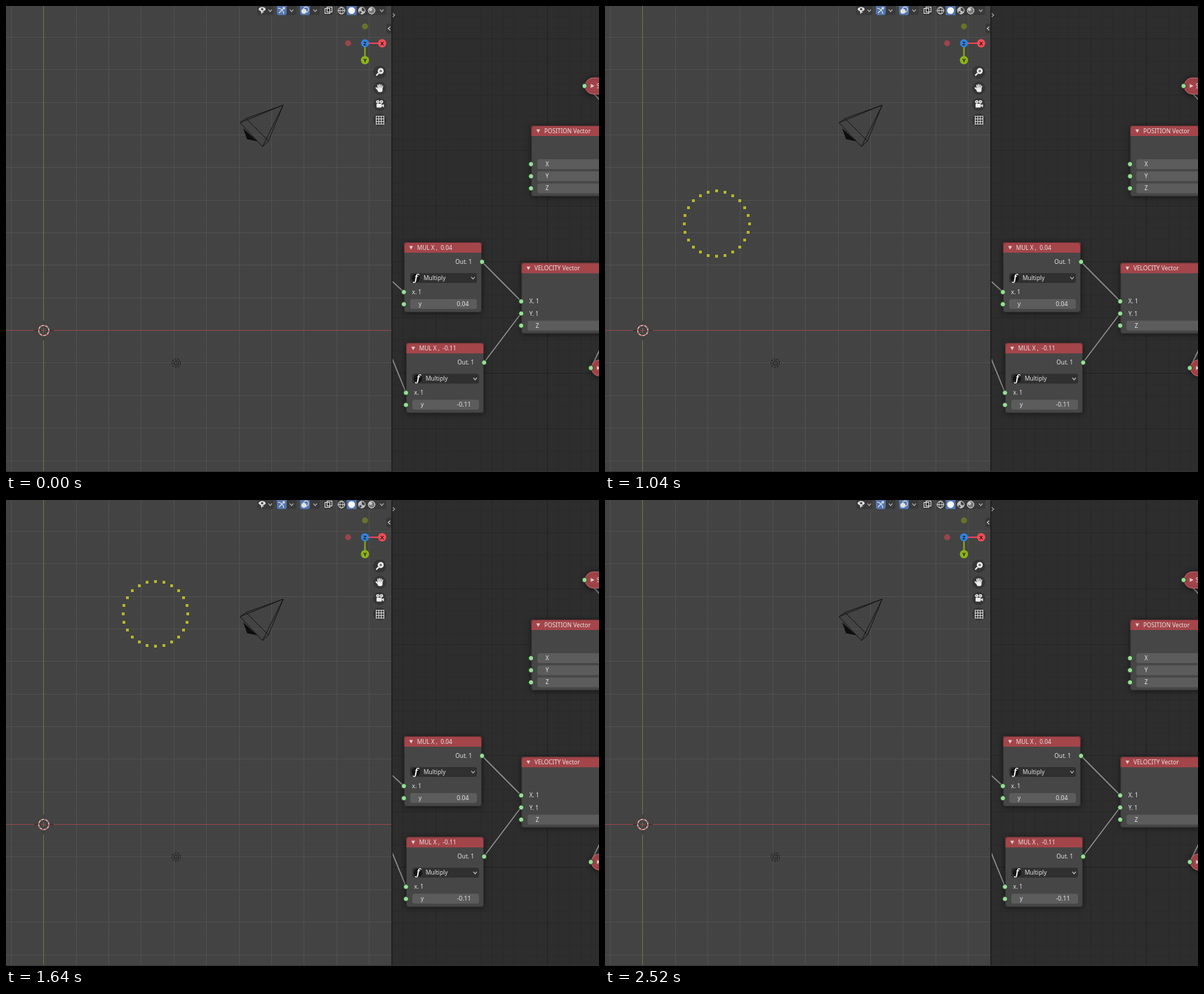
An HTML page with a canvas for the animation above (2600 ms loop, 845 px wide and 663 px high).

```html
<!DOCTYPE html>
<html lang="en">
<head>
<meta charset="utf-8">
<title>Particle circle with node editor</title>
<style>
html, body { margin: 0; width: 100%; height: 100%; overflow: hidden; background: #434343; }
canvas { display: block; }
</style>
</head>
<body>
<canvas id="stage" width="845" height="663"></canvas>
<script>
const W = 845, H = 663, LOOP = 2600, TAU = Math.PI * 2;
const UNIT = 46.37, ORIGIN = { x: 53.8, y: 461.6 };
const view = document.getElementById('stage').getContext('2d');
const backdrop = document.createElement('canvas');
backdrop.width = W;
backdrop.height = H;
const g = backdrop.getContext('2d');

function rect(x, y, w, h, fill) {
  g.fillStyle = fill;
  g.fillRect(x, y, w, h);
}

function line(points, color, width = 1, close = false) {
  g.beginPath();
  points.forEach(([x, y]) => g.lineTo(x, y));
  if (close) g.closePath();
  g.strokeStyle = color;
  g.lineWidth = width;
  g.stroke();
}

function poly(points, fill) {
  g.beginPath();
  points.forEach(([x, y]) => g.lineTo(x, y));
  g.fillStyle = fill;
  g.fill();
}

function disc(x, y, r, fill, stroke, width = 1) {
  g.beginPath();
  g.arc(x, y, r, 0, TAU);
  if (fill) { g.fillStyle = fill; g.fill(); }
  if (stroke) { g.strokeStyle = stroke; g.lineWidth = width; g.stroke(); }
}

function box(x, y, w, h, r, fill, stroke) {
  g.beginPath();
  g.roundRect(x, y, w, h, r);
  if (fill) { g.fillStyle = fill; g.fill(); }
  if (stroke) { g.strokeStyle = stroke; g.lineWidth = 1; g.stroke(); }
}

function text(str, x, y, { size = 8.3, align = 'left', color = '#e4e4e4', weight = '' } = {}) {
  g.font = `${weight} ${size}px "Noto Sans", sans-serif`;
  g.textAlign = align;
  g.textBaseline = 'alphabetic';
  g.fillStyle = color;
  g.fillText(str, x, y + 3);
}

function chevron(x, y, dx = 0, dy = 1, color = '#c8c8c8') {
  const tip = 1.5, wing = 2.5;
  line([
    [x - dx * tip - dy * wing, y - dy * tip - dx * wing],
    [x + dx * tip, y + dy * tip],
    [x - dx * tip + dy * wing, y - dy * tip + dx * wing]
  ], color, 1.1);
}

function viewportGrid() {
  rect(0, 0, 549, H, '#434343');
  const sub = UNIT / 10;
  for (let x = ORIGIN.x % sub; x < 549; x += sub) rect(x - 0.5, 0, 1, H, 'rgba(255,255,255,.008)');
  for (let y = ORIGIN.y % sub; y < H; y += sub) rect(0, y - 0.5, 549, 1, 'rgba(255,255,255,.008)');
  for (let x = ORIGIN.x % UNIT; x < 549; x += UNIT) rect(Math.floor(x), 0, 1, H, '#505050');
  for (let y = ORIGIN.y % UNIT; y < H; y += UNIT) rect(0, Math.floor(y), 549, 1, '#505050');
  rect(53, 0, 1, H, '#6c7743');
  rect(0, 461, 549, 1, '#95484a');
}

function cursor3d() {
  const { x, y } = ORIGIN;
  [[0, 1], [0, -1], [1, 0], [-1, 0]].forEach(([dx, dy]) =>
    line([[x + dx * 4, y + dy * 4], [x + dx * 14, y + dy * 14]], '#302c2a'));
  disc(x, y, 7.3, null, '#e9dcdc', 1.3);
  g.setLineDash([2.87, 2.87]);
  disc(x, y, 7.3, null, '#c94a4a', 1.3);
  g.setLineDash([]);
}

function cameraAndLamp() {
  const apex = [395, 141];
  const frame = [[333.5, 166], [342, 160], [374, 192], [365.5, 200]];
  line(frame, '#161616', 1, true);
  frame.forEach(p => line([apex, p], '#161616'));
  poly([[338, 174], [343.5, 189.5], [358, 192.5]], '#0d0d0d');

  const x = 242.5, y = 508;
  disc(x, y, 3.2, null, '#1e1e1e');
  disc(x, y, 0.8, '#1e1e1e');
  g.setLineDash([2.3, 1.9]);
  disc(x, y, 6, null, '#1e1e1e', 1.2);
  g.setLineDash([]);
}

function toolbar() {
  const white = '#e2e2e2', blue = '#5275ad', dark = '#393939';
  box(358, -4, 23, 17, 3, dark);
  box(386, -4, 28, 17, 3, dark);
  box(386, -4, 14, 17, 3, blue);
  box(419, -4, 28, 17, 3, dark);
  box(419, -4, 14, 17, 3, blue);
  box(453, -4, 13, 17, 3, dark);
  box(472, -4, 70, 17, 3, dark);
  rect(485.5, 0, 14, 13, blue);
  [376.5, 407, 440.5, 535.5].forEach(x => chevron(x, 6.5));

  // visibility
  g.beginPath();
  g.ellipse(365, 4.5, 5, 3, 0, 0, TAU);
  g.fillStyle = white;
  g.fill();
  disc(365, 4.5, 1.6, dark);
  poly([[363, 6], [368, 9], [365, 9.5], [364, 12]], white);

  // gizmo toggle
  g.beginPath();
  g.arc(387, 12, 9, -1.5, -0.1);
  g.strokeStyle = white;
  g.lineWidth = 1.1;
  g.stroke();
  line([[389, 10], [396, 3]], white, 1.1);
  poly([[397.5, 1.5], [397, 5.5], [393.5, 2]], white);

  // overlays
  disc(424.5, 7.5, 3.6, white);
  disc(427.5, 5, 3.6, null, white, 1.1);

  // x-ray
  g.strokeStyle = white;
  g.lineWidth = 1;
  g.strokeRect(454.5, 3.5, 7, 7);
  g.strokeRect(457.5, 1.5, 7, 7);

  // shading modes
  disc(478, 6.5, 4.8, null, white);
  line([[473, 6.5], [483, 6.5]], white, 0.8);
  g.beginPath();
  g.ellipse(478, 6.5, 2.1, 4.8, 0, 0, TAU);
  g.stroke();
  disc(492.4, 6.5, 4.8, '#fff');
  disc(507, 6.5, 4.8, '#bdbdbd', white, 0.8);
  poly([[507, 6.5], [507, 2], [511, 4], [511, 8]], '#444');
  disc(505, 9, 1.7, '#444');
  disc(521, 6.5, 4.8, '#777', white);
  disc(519.5, 5, 2.3, '#ccc');
}

function axisGizmo() {
  const label = (s, x, y) => text(s, x, y, { size: 7.5, align: 'center', color: '#1a1a1a', weight: 'bold' });
  line([[512, 53], [536, 53]], '#e8455a', 2);
  line([[511.5, 53], [511.5, 77]], '#8bb01c', 2);
  disc(511.5, 29, 4.3, '#67732a');
  disc(487.5, 53, 4.3, '#9a444b');
  disc(511.5, 53, 5.7, '#3084e0');
  disc(536, 53, 5.9, '#f34b55');
  disc(511.5, 77, 5.9, '#8bb31a');
  label('Z', 511.5, 53);
  label('X', 536, 53);
  label('Y', 511.5, 77);
  box(542, 25, 10, 14, 4, '#363636');
  chevron(546, 32, -1, 0);
}

function navButtons() {
  const x = 532.5, white = '#eeeeee';
  [94, 117, 140, 162].forEach(y => disc(x, y, 9.3, '#353535'));

  disc(534, 92.5, 4.2, white);
  line([[531, 95.5], [527.5, 99]], white, 2);
  line([[532, 92.5], [536, 92.5]], '#444');
  line([[534, 90.5], [534, 94.5]], '#444');

  g.lineCap = 'round';
  [[530, 112.5], [532.3, 111.7], [534.6, 112.3], [536.7, 114]].forEach(([fx, fy], i) =>
    line([[530.4 + i * 1.7, 118], [fx, fy]], white, 1.6));
  line([[527.5, 116.5], [531, 120]], white, 1.8);
  g.lineCap = 'butt';
  box(529.6, 116.5, 6.9, 6, 2.5, white);

  disc(529.8, 136.3, 2.4, white);
  disc(535, 136.3, 2.4, white);
  disc(529.8, 136.3, 0.8, '#444');
  disc(535, 136.3, 0.8, '#444');
  box(528, 139, 7.5, 5.5, 1, white);
  poly([[535, 141.5], [538.5, 139.5], [538.5, 144.5]], white);

  for (let i = 0; i < 4; i++) {
    const d = -5 + i * 3.67;
    line([[x - 5.5, 162 + d], [x + 6.5, 162 + d]], white, 0.9);
    line([[x + d, 156.5], [x + d, 168.5]], white, 0.9);
  }
}

function nodeGrid() {
  rect(551, 0, W - 551, H, '#2d2d2d');
  const step = 15.86, ox = 771.5, oy = 522.5;
  const shade = i => i === 0 ? '#222222' : i % 5 === 0 ? '#272727' : '#2a2a2a';
  for (let i = -13; i < 5; i++) rect(Math.floor(ox + i * step), 0, 1, H, shade(i));
  for (let i = -33; i < 9; i++) rect(551, Math.floor(oy + i * step), W - 551, 1, shade(i));
  rect(549, 0, 2, H, '#222222');
  chevron(552.5, 13, 1, 0, '#a0a0a0');
}

function withShadow(draw) {
  g.save();
  g.shadowColor = 'rgba(0,0,0,.55)';
  g.shadowBlur = 7;
  g.shadowOffsetY = 1;
  draw();
  g.restore();
}

const socket = (x, y) => disc(x, y, 3.5, '#98de98', '#1d2a1d', 0.8);
const field = (x, y, w) => box(x, y - 7, w, 14, 3, '#5c5c5c');

function panel(x, y, w, h, title) {
  withShadow(() => box(x, y, w, h, 4, '#464646'));
  box(x, y, w, 15, [4, 4, 0, 0], '#a4454a');
  box(x + 0.5, y + 0.5, w - 1, h - 1, 4, null, 'rgba(20,20,20,.45)');
  poly([[x + 7.5, y + 5.5], [x + 13, y + 5.5], [x + 10.2, y + 10.5]], '#e0cccc');
  text(title, x + 18.7, y + 7.8);
}

function multiplyNode(x, y, value) {
  panel(x, y, 111, 100, `MUL X ,  ${value}`);
  text('Out. 1', x + 97, y + 28, { align: 'right' });
  box(x + 9, y + 44, 95, 14, 3, '#303030');
  disc(x + 17, y + 51, 6, '#151515');
  g.font = 'italic bold 12px "Noto Serif", serif';
  g.textAlign = 'center';
  g.fillStyle = '#fff';
  g.fillText('ƒ', x + 17, y + 54.5);
  text('Multiply', x + 28, y + 51);
  chevron(x + 98.5, y + 51);
  text('x. 1', x + 11.5, y + 71);
  field(x + 9, y + 88, 95);
  text('y', x + 21, y + 88);
  text(value, x + 92.5, y + 88, { size: 8.7, align: 'right' });
  socket(x + 111.3, y + 28);
  socket(x, y + 71);
  socket(x, y + 88.3);
}

function vectorNode(x, y, title, rows) {
  panel(x, y, 130, 101, title);
  rows.forEach(([label, linked], i) => {
    const ry = y + 55 + i * 17.2;
    if (!linked) field(x + 9, ry, 112);
    text(label, x + (linked ? 11.5 : 20.5), ry);
    socket(x, ry);
  });
}

function collapsedNode(x, y, title) {
  withShadow(() => box(x, y - 11.5, 80, 23, 11.5, '#a4454a', '#c76c70'));
  poly([[x + 8, y - 2.7], [x + 8, y + 2.7], [x + 13.2, y]], '#e0cccc');
  text(title, x + 16.5, y);
  socket(x - 0.8, y);
}

function nodeEditor() {
  nodeGrid();
  g.save();
  g.beginPath();
  g.rect(551, 0, W - 551, H);
  g.clip();
  [
    [[540, 382], [567, 407]],
    [[541, 479], [570, 550]],
    [[678.3, 364], [734, 420]],
    [[681.3, 507], [734, 437.3]],
    [[834, 121], [850, 138]],
    [[833.5, 515], [847, 487]]
  ].forEach(link => {
    line(link, '#202020', 3.2);
    line(link, '#878787', 1.9);
  });
  vectorNode(748.2, 170, 'POSITION Vector', [['X'], ['Y'], ['Z']]);
  vectorNode(734.2, 365.3, 'VELOCITY Vector', [['X. 1', true], ['Y. 1', true], ['Z']]);
  multiplyNode(567, 336, '0.04');
  multiplyNode(570, 479.3, '-0.11');
  collapsedNode(825.3, 113.8, 'S');
  collapsedNode(834.2, 515, '');
  g.restore();
}

function buildBackdrop() {
  viewportGrid();
  cursor3d();
  cameraAndLamp();
  toolbar();
  axisGizmo();
  navButtons();
  nodeEditor();
  rect(0, 662, W, 1, '#303030');
}

// Playback runs at about 20 steps a second, seen on a 40 ms clock.
const SLOT = 40, STEP = 49.09, PHASE = 45.75, FIRST = 8, LAST = 50;

function drawCircle(t) {
  const slot = Math.floor(t / SLOT + 1e-6) * SLOT;
  const step = Math.floor((slot - PHASE) / STEP);
  if (step < FIRST || step >= LAST) return;
  const n = Math.ceil(2.44 * (step - 15));
  const cx = 135.1 + n * 0.04 * UNIT;
  const cy = 376.1 - n * 0.11 * UNIT;
  view.fillStyle = '#b6b62c';
  for (let i = 0; i < 24; i++) {
    const a = i * TAU / 24;
    const x = cx + UNIT * Math.cos(a), y = cy + UNIT * Math.sin(a);
    view.fillRect(Math.round(x - 2), Math.round(y - 2), 4, 4);
  }
}

const start = performance.now();

function render() {
  view.drawImage(backdrop, 0, 0);
  drawCircle((performance.now() - start) % LOOP);
  requestAnimationFrame(render);
}

buildBackdrop();
render();
</script>
</body>
</html>
```
